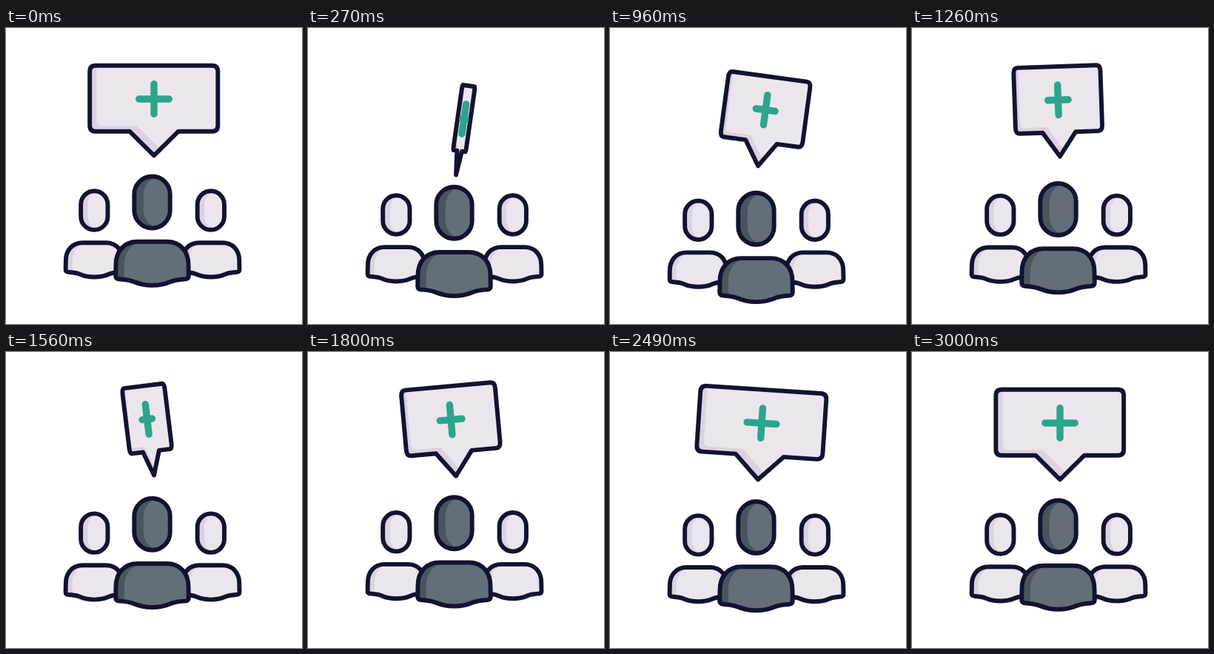
An HTML page with a canvas for the animation above (5090 ms loop, 400 by 400 pixels).

```html
<!DOCTYPE html>
<html lang="en">
<head>
<meta charset="utf-8">
<title>Group with message</title>
<style>
  html, body { margin: 0; width: 100%; height: 100%; overflow: hidden; background: #fff; }
  canvas { display: block; width: 100vw; height: 100vh; }
</style>
</head>
<body>
<canvas id="stage"></canvas>
<script>
const LOOP = 5090, ACTIVE = 3000, STEP = 30, SIZE = 400;
const INK = '#121331', GREEN = '#2ca58d';
const LIGHT = { fill: '#ebe6ed', shade: '#dcd2e1' };
const DARK = { fill: '#646e79', shade: '#4a545d' };
const LINE = 5.9;

const canvas = document.getElementById('stage');
const ctx = canvas.getContext('2d');

const rad = deg => deg * Math.PI / 180;
const kick = u => Math.sin(Math.PI / 2 * u ** 1.15);
const sway = u => (1 - Math.cos(Math.PI * u)) / 2;

// Starts at rest, kicks to the first turning point, then sways between the others.
function swing(...turns) {
  return t => {
    let start = 0, from = 0, ease = kick;
    for (const [end, to] of turns) {
      if (t < end) return from + (to - from) * ease((t - start) / (end - start));
      [start, from, ease] = [end, to, sway];
    }
    return from;
  };
}

const leaderDrop = swing([620, 25], [800, 24.5], [1700, -4.5], [2480, 1.5], [2700, 0]);
const sideDrop = swing([800, 13.6], [880, 13.6], [1720, -3.4], [2500, 0.8], [2700, 0]);
const bubbleDrop = swing([380, 30], [1630, -6], [2200, 0]);
const tilt = swing([600, 13.9], [1580, -7], [2400, 4], [3000, 0]);

// One full turn at a steady rate, then a half turn that settles.
function spin(t) {
  const rate = 0.323, turned = 360 / rate;
  return t < turned ? rate * t : 540 - 180 * Math.exp(-0.0021 * (t - turned));
}

const HEAD = new Path2D();
HEAD.roundRect(-24.2, 0, 48.4, 70, 24.2);

const BODY = new Path2D(`M-20 0 H20 C38 0 49 13 49 31 L49.3 46 Q49.3 50 45 50.5
  C38 51 32 51 24 54.5 C17 57.5 9 59 0 59 C-9 59 -17 57.5 -24 54.5
  C-32 51 -38 51 -45 50.5 Q-49.3 50 -49.3 46 L-49 31 C-49 13 -38 0 -20 0 Z`);

// Speech bubble with its tail tip at the origin.
const BUBBLE = new Path2D(`M-78.8 -121.6 H78.3 Q86.3 -121.6 86.3 -113.6 V-40.6
  Q86.3 -32.6 78.3 -32.6 H33 L0 0 L-33 -32.6 H-78.8
  Q-86.8 -32.6 -86.8 -40.6 V-113.6 Q-86.8 -121.6 -78.8 -121.6 Z`);
const FACE = new Path2D('M-77.5 -135 V-48 Q-77.5 -40 -69.5 -40 H-23.5 L9 -8 H100 V-135 Z');
const PLUS = new Path2D('M-20.3 -76.3 H20.3 M0 -96.6 V-56');

// Scales the geometry but keeps the line weight.
function scaled(path, sx, sy) {
  const p = new Path2D();
  p.addPath(path, new DOMMatrix([sx, 0, 0, sy, 0, 0]));
  return p;
}

function solid(shape, face, shift, tone) {
  ctx.save();
  ctx.clip(shape);
  ctx.fillStyle = tone.shade;
  ctx.fill(shape);
  ctx.translate(shift, 0);
  ctx.fillStyle = tone.fill;
  ctx.fill(face);
  ctx.restore();
  ctx.strokeStyle = INK;
  ctx.lineWidth = LINE;
  ctx.stroke(shape);
}

function part(path, x, y, scale, shift, tone) {
  const shape = scaled(path, scale, scale);
  ctx.save();
  ctx.translate(x, y);
  solid(shape, shape, shift * scale, tone);
  ctx.restore();
}

function person(x, headY, bodyY, headScale, bodyScale, tone) {
  part(BODY, x, bodyY, bodyScale, 11.5, tone);
  part(HEAD, x, headY, headScale, 12.5, tone);
}

function bubble(t) {
  const sx = Math.max(0.1, Math.abs(Math.cos(rad(spin(t)))));
  ctx.save();
  ctx.translate(200, 172.3 + bubbleDrop(t));
  ctx.rotate(rad(tilt(t)));
  solid(scaled(BUBBLE, sx, 1), scaled(FACE, sx, 1), 0, LIGHT);
  ctx.strokeStyle = GREEN;
  ctx.lineWidth = 9.4;
  ctx.stroke(scaled(PLUS, sx, 1));
  ctx.restore();
}

function draw(t) {
  ctx.fillStyle = '#fff';
  ctx.fillRect(0, 0, SIZE, SIZE);
  ctx.lineJoin = ctx.lineCap = 'round';
  const side = sideDrop(t), lead = leaderDrop(t);
  for (const x of [119.3, 276.8]) {
    person(x, 220.3 + side, 290.2 + side, 0.75, 0.785, LIGHT);
  }
  person(197.5, 200.5 + lead, 288.8 + lead, 1, 1, DARK);
  bubble(t);
}

function frame(now) {
  const w = Math.round(innerWidth * devicePixelRatio);
  const h = Math.round(innerHeight * devicePixelRatio);
  if (canvas.width !== w || canvas.height !== h) {
    canvas.width = w;
    canvas.height = h;
  }
  ctx.setTransform(w / SIZE, 0, 0, h / SIZE, 0, 0);
  const t = Math.min(now % LOOP, ACTIVE);
  draw(Math.floor(t / STEP) * STEP);
  requestAnimationFrame(frame);
}
frame(performance.now());
</script>
</body>
</html>
```
